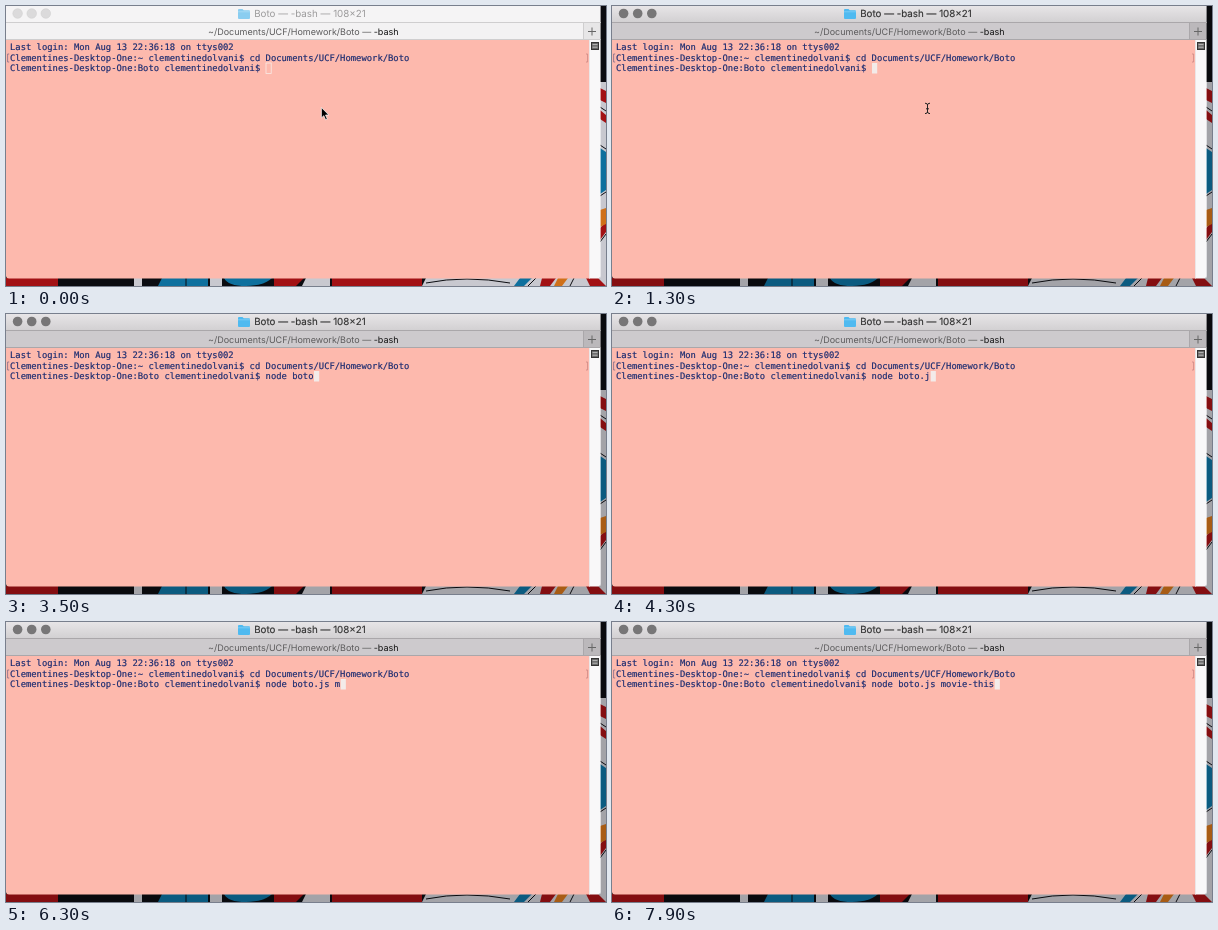
Recreate the animation shown at these times as an HTML page. Size 600 by 280 pixels, loop 8000 ms.

```html
<!DOCTYPE html>
<html lang="en">
<head>
<meta charset="utf-8">
<title>Terminal</title>
<style>
  html, body { margin: 0; width: 100%; height: 100%; overflow: hidden; background: #0c0d12; }
  svg { display: block; width: 600px; height: 280px; }
  text { text-rendering: geometricPrecision; white-space: pre; }
  .ui { font-family: Inter, "Open Sans", sans-serif; text-anchor: middle; }
  .mono { font: 8.86px "DejaVu Sans Mono", "Liberation Mono", monospace; fill: #1a2b70; stroke: #1a2b70; stroke-width: .18; }

  #bar { fill: url(#barOn); }
  #tab { fill: #cdcacd; }
  #plus { fill: #bbb8bb; }
  #lights { fill: #777677; }
  #folder { fill: #4fbaf0; }
  #title { fill: #333; stroke: #333; stroke-width: .15; }
  .line { stroke: #aaa7aa; }
  #caret { fill: #f3ebe9; }
  #shade { fill: #000; opacity: .25; }

  .idle #bar { fill: #f5f4f5; }
  .idle #tab { fill: #f3f2f3; }
  .idle #plus { fill: #e7e6e7; }
  .idle #lights { fill: #dbdadb; stroke: #cdcccd; stroke-width: .5; }
  .idle #folder { fill: #8acdf0; }
  .idle #title { fill: #9c9b9c; stroke: none; }
  .idle .line { stroke: #cfcecf; }
  .idle #caret { fill: none; stroke: #f9ece7; stroke-width: .8; }
  .idle #shade { opacity: .08; }
</style>
</head>
<body>
<svg id="stage" viewBox="0 0 600 280">
  <defs>
    <linearGradient id="barOn" x2="0" y2="1">
      <stop stop-color="#e7e5e7"/>
      <stop offset="1" stop-color="#d1cfd1"/>
    </linearGradient>
  </defs>

  <!-- desktop behind the window -->
  <rect width="600" height="280" fill="#0c0d12"/>
  <path fill="#d9d9e0" d="M594 76h6v204H416l4-8h174zM128 272h8v8h-8zM204 272h12v8h-12zM300 272h24v8h-28z"/>
  <path fill="#b01216" d="M594 82l6 3v12l-6-3zM594 104l6 5v8l-6-4zM594 222l6-6v10l-6 8zM0 272h52v8H0zM268 272h30l-8 8h-22zM326 272h90v8h-90zM536 272h14l-6 8h-10zM580 272h12l8 8h-16z"/>
  <path fill="#0f79ab" d="M594 142l6 4v38l-6 4zM156 272h46v8h-50zM218 272h48q-8 8-26 8t-22-8zM514 272h12l-8 8h-10z"/>
  <path fill="#e07a1c" d="M594 204l6-2v16l-6 3zM552 272h10l-6 8h-8z"/>
  <path stroke="#0c0d12" fill="none" d="M594 101l6 4M594 139l6 4M594 190l6-4M594 236l6-8M180 272v8M420 277q40-8 84 0M530 272l-8 8M568 272l-4 8"/>
  <path id="shade" d="M594.5 0h5.5v280H0v-8h594.5z"/>

  <!-- window frame -->
  <rect id="bar" width="594.6" height="17"/>
  <rect id="tab" y="16" width="577" height="18"/>
  <rect id="plus" x="577" y="16" width="17.6" height="18"/>
  <path class="line" d="M0 16.5H594.6M0 33.5H594.6M577.5 17V33" fill="none"/>
  <path d="M586 21.5v8M582 25.5h8" stroke="#666" fill="none"/>
  <g id="lights">
    <circle cx="11.6" cy="7.5" r="4.8"/>
    <circle cx="25.7" cy="7.5" r="4.8"/>
    <circle cx="39.8" cy="7.5" r="4.8"/>
  </g>
  <path id="folder" d="M232 4q0-1 1-1h3.5l1.2 1.3h5.3q1 0 1 1V12q0 1-1 1h-10q-1 0-1-1z"/>
  <path d="M232 5.8h12" stroke="#fff" stroke-opacity=".35" stroke-width=".7"/>
  <text id="title" class="ui" x="304" y="11.4" font-size="9.8">Boto — -bash — 108×21</text>
  <text class="ui" x="297.3" y="28.7" font-size="9" fill="#5c5b5c">~/Documents/UCF/Homework/Boto — <tspan fill="#111">-bash</tspan></text>

  <!-- terminal -->
  <path d="M0 34h583v238.5H3q-3 0-3-3z" fill="#fdb9ad"/>
  <path d="M583 34h11.6v235.5q0 3-3 3H583z" fill="#f9f8f9"/>
  <path d="M583.5 34v238.5" stroke="#ebe6e7"/>
  <rect x="585.5" y="36.5" width="7" height="7" fill="#666" stroke="#333"/>
  <path d="M586.5 38.6h5M586.5 41.2h5" stroke="#ddd" stroke-width=".7"/>
  <path d="M3.2 48H1.6v8h1.6" stroke="#806a88" stroke-width=".8" fill="none"/>
  <path d="M580 48h1.6v8H580" stroke="#c98580" stroke-width=".8" fill="none"/>
  <rect id="caret" y="57" width="5.2" height="10.5"/>
  <g class="mono">
    <text x="4" y="44.2">Last login: Mon Aug 13 22:36:18 on ttys002</text>
    <text x="4" y="54.7">Clementines-Desktop-One:~ clementinedolvani$ cd Documents/UCF/Homework/Boto</text>
    <text id="prompt" x="4" y="65.3"></text>
  </g>

  <path id="arrow" d="M315.4 101.5v10.4l2.4-2.2 1.8 4.1 1.7-.8-1.8-4h3.3z" stroke="#fff" stroke-width=".7"/>
  <path id="beam" d="M313 97.2q2.5 0 2.5 1.8 0-1.8 2.5-1.8M315.5 98v8.8M313 107.6q2.5 0 2.5-1.8 0 1.8 2.5 1.8M314 102.8h3" fill="none" stroke="#222"/>
</svg>
<script>
  const $ = id => document.getElementById(id);
  const LOOP = 8000, FOCUS = 1100, CELL = 16 / 3;
  const PROMPT = "Clementines-Desktop-One:Boto clementinedolvani$ ";

  // Each burst of typing: first key time, gap between keys, keys ("<" is backspace).
  const bursts = [
    [1900, 180, "node "],
    [2900, 180, "boto"],
    [3800, 280, ".js o"],
    [5600, 400, "<m"],
    [6400, 170, "ovie-this"]
  ];
  const presses = bursts.flatMap(([at, gap, keys]) =>
    [...keys].map((key, i) => ({ key, at: at + i * gap })));

  const typed = t => presses
    .filter(p => p.at <= t)
    .reduce((line, { key }) => key === "<" ? line.slice(0, -1) : line + key, "");

  const show = (id, on) => $(id).setAttribute("visibility", on ? "visible" : "hidden");

  function draw() {
    const t = (performance.now() - start) % LOOP;
    const line = PROMPT + typed(t);
    $("stage").classList.toggle("idle", t < FOCUS);
    $("prompt").textContent = line;
    $("caret").setAttribute("x", 4 + line.length * CELL);
    show("arrow", t < FOCUS);
    show("beam", t >= FOCUS && t < presses[0].at);
    requestAnimationFrame(draw);
  }

  const start = performance.now();
  draw();
</script>
</body>
</html>
```
